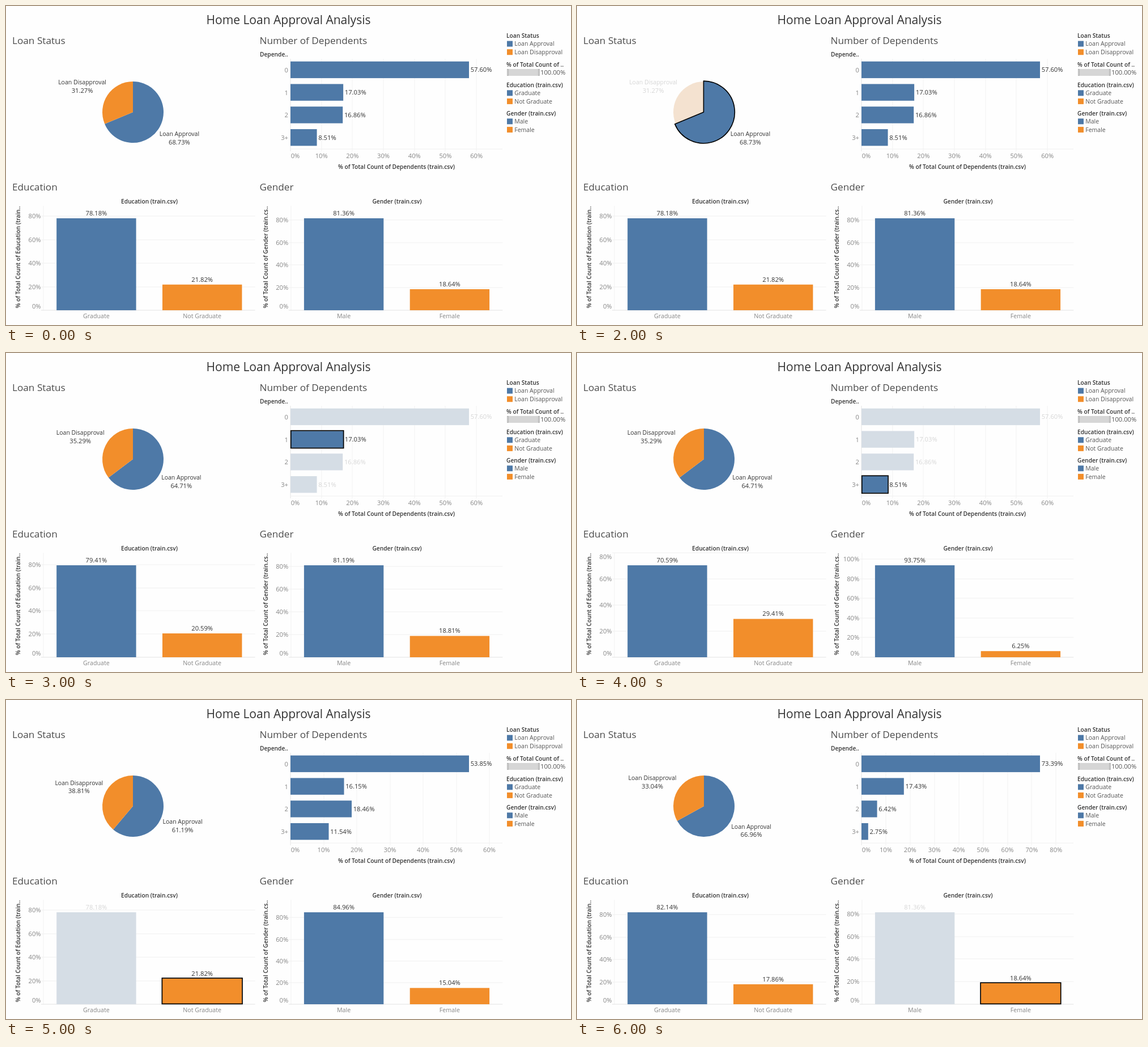
Animation, 997 px wide and 562 px high, one loop 6.5 s. Source, as an HTML page:

```html
<!DOCTYPE html>
<html lang="en">
<head>
<meta charset="utf-8">
<title>Home Loan Approval Analysis</title>
<style>
  html, body { margin: 0; width: 100%; height: 100%; overflow: hidden; background: #fefefe; }
  svg { display: block; width: 997px; height: 562px; font-family: "Open Sans", "Noto Sans", sans-serif; }
</style>
</head>
<body>
<svg id="stage" viewBox="0 0 997 562"></svg>
<script>
const BLUE = '#4e79a7', ORANGE = '#f28e2b';
const DIM = { [BLUE]: '#d5dde5', [ORANGE]: '#f4e2d0' };
const INK = '#333', GREY = '#868686', FADED = '#d6d6d6', GRID = '#f1f1f1', AXIS = '#e4e4e4';
const STEP = 500;

const base = {
  loan: [422, 192], dep: [345, 102, 101, 51],
  edu: [480, 134], sex: [489, 112]
};
const pick = (chart, index, data) => ({ ...base, ...data, chart, index });

const states = [
  base,
  base,
  pick('loan', 1),
  base,
  pick('loan', 0),
  pick('dep', 0, { loan: [238, 107], edu: [275, 70], sex: [258, 80] }),
  pick('dep', 1, { loan: [66, 36], edu: [81, 21], sex: [82, 19] }),
  pick('dep', 2, { loan: [76, 25], edu: [77, 24], sex: [92, 7] }),
  pick('dep', 3, { loan: [33, 18], edu: [36, 15], sex: [45, 3] }),
  pick('edu', 0, { loan: [340, 140], dep: [275, 81, 77, 36], sex: [376, 92] }),
  pick('edu', 1, { loan: [82, 52], dep: [70, 21, 24, 15], sex: [113, 20] }),
  pick('sex', 0, { loan: [339, 150], dep: [258, 82, 92, 45], edu: [376, 113] }),
  pick('sex', 1, { loan: [75, 37], dep: [80, 19, 7, 3], edu: [92, 20] })
];

// y is the vertical centre of the capitals
function text(str, x, y, { size = 10.5, fill = INK, anchor = 'start', weight = 400, turn = 0 } = {}) {
  const spin = turn ? ` transform="rotate(${turn} ${x} ${y})"` : '';
  return `<text x="${x}" y="${y + size * 0.36}" font-size="${size}" fill="${fill}" ` +
    `text-anchor="${anchor}" font-weight="${weight}"${spin}>${str}</text>`;
}
const bold = (str, x, y, opt) => text(str, x, y, { size: 10.2, weight: 600, ...opt });
const number = (str, x, y, opt) => text(str, x, y, { size: 11.2, ...opt });
const rect = (x, y, w, h, fill, extra = '') =>
  `<rect x="${x}" y="${y}" width="${w}" height="${h}" fill="${fill}" ${extra}/>`;
const hline = (x1, x2, y, fill) => rect(x1, Math.round(y) - 0.5, x2 - x1, 1, fill);
const vline = (x, y1, y2, fill) => rect(Math.round(x) - 0.5, y1, 1, y2 - y1, fill);
const outline = (x1, y1, x2, y2) =>
  rect(x1, y1, x2 - x1, y2 - y1, 'none', 'stroke="#000" stroke-width="1.7"');

const percents = counts => {
  const total = counts.reduce((a, b) => a + b);
  return counts.map(n => n / total * 100);
};
const label = p => p.toFixed(2) + '%';

function look(state, chart, i, color) {
  const on = state.chart === chart && state.index === i;
  const off = state.chart === chart && !on;
  return { on, fill: off ? DIM[color] : color, ink: off ? FADED : INK };
}

function pie(state) {
  const cx = 224, cy = 187, r = 54;
  const share = percents(state.loan), split = share[0] / 100;
  const at = (turn, rad, x = cx) => {
    const a = turn * 2 * Math.PI;
    return [x + rad * Math.sin(a), cy - rad * Math.cos(a)];
  };
  const slice = (from, to, rad, x) =>
    `M${x} ${cy}L${at(from, rad, x)}A${rad} ${rad} 0 ${to - from > 0.5 ? 1 : 0} 1 ${at(to, rad, x)}Z`;
  const parts = [
    { name: 'Loan Approval', color: BLUE, from: 0, to: split, dx: 37, dy: 8.5, nudge: -0.6 },
    { name: 'Loan Disapproval', color: ORANGE, from: split, to: 0.99999, dx: -44.5, dy: -22.5, nudge: 0.6 }
  ];
  let shapes = '', edge = '', labels = '';
  parts.forEach((p, i) => {
    const s = look(state, 'loan', i, p.color);
    shapes += `<path d="${slice(p.from, p.to, r, cx)}" fill="${s.fill}"/>`;
    if (s.on) edge = `<path d="${slice(p.from, p.to, r + 0.9, cx + p.nudge)}" fill="${s.fill}" ` +
      'stroke="#000" stroke-width="1.6" stroke-linejoin="round"/>';
    const [x, y] = at((p.from + p.to) / 2, r);
    const opt = { anchor: 'middle', fill: s.ink };
    labels += text(p.name, x + p.dx, y + p.dy, opt) + number(label(share[i]), x + p.dx, y + p.dy + 14.5, opt);
  });
  return shapes + edge + labels;
}

function rows(state) {
  const x0 = 502, right = 876, share = percents(state.dep);
  const scale = 315 / Math.max(...share);
  let grid = '', bars = '';
  for (let v = 0; x0 + v * scale < right - 12; v += 10) {
    const x = x0 + v * scale;
    grid += vline(x, 93, 256, v ? GRID : AXIS) +
      number(v + '%', Math.max(x, x0 + 8.5), 264, { anchor: 'middle', fill: GREY });
  }
  grid += hline(x0, right, 252, GRID);
  ['0', '1', '2', '3+'].forEach((name, i) => {
    const y = 112.4 + i * 39.75, w = share[i] * scale;
    const s = look(state, 'dep', i, BLUE);
    bars += rect(x0, y - 14.7, w, 29.4, s.fill);
    if (s.on) bars += outline(x0 + 0.7, y - 15.4, x0 + w + 0.5, y + 15.4);
    bars += number(name, 498, y + 0.5, { anchor: 'end', fill: GREY }) +
      number(label(share[i]), x0 + w + 2.7, y, { fill: s.ink });
  });
  return grid + bars;
}

function columns(state, chart, left, names) {
  const top = 352, floor = 536, band = 186.8, wide = 140.4;
  const share = percents(state[chart]), scale = 162 / Math.max(...share);
  let grid = vline(left, top, floor, GRID), bars = '';
  for (let v = 0; floor - v * scale >= top; v += 20) {
    const y = floor - v * scale;
    grid += hline(left - 4, left + 2 * band, y, v ? GRID : AXIS) +
      number(v + '%', left - 4.5, Math.min(Math.max(y, top + 6.5), floor - 7), { anchor: 'end', fill: GREY });
  }
  names.forEach((name, i) => {
    const mid = left + band * (i + 0.5), x = mid - wide / 2;
    const h = share[i] * scale, y = floor - h;
    const s = look(state, chart, i, i ? ORANGE : BLUE);
    bars += rect(x, y, wide, h, s.fill);
    if (s.on) bars += outline(x - 0.6, y - 0.8, x + wide + 0.6, floor - 0.6);
    bars += number(label(share[i]), mid, y - 9.3, { anchor: 'middle', fill: s.ink }) +
      text(name, mid, 546, { anchor: 'middle', fill: GREY, size: 10.7 });
  });
  return grid + bars;
}

function legend(title, y, names) {
  return bold(title, 883, y) + names.map((name, i) => {
    const row = y + 14.3 + i * 14.6;
    return rect(884, row - 5, 10, 10, i ? ORANGE : BLUE) + text(name, 897.3, row, { fill: '#555' });
  }).join('');
}

function frame() {
  const mid = { anchor: 'middle' };
  const head = { size: 17.2, fill: '#4c4c4c' };
  const side = { anchor: 'middle', turn: -90 };
  return text('Home Loan Approval Analysis', 498.5, 24, { ...mid, size: 21 }) +
    text('Loan Status', 11, 60.5, head) +
    text('Number of Dependents', 447.5, 60.5, head) +
    text('Education', 11, 318.5, head) +
    text('Gender', 447.5, 318.5, head) +
    bold('Depende..', 448, 85.5) +
    bold('% of Total Count of Dependents (train.csv)', 689, 283.5, mid) +
    bold('Education (train.csv)', 253, 344, mid) +
    bold('Gender (train.csv)', 690, 344, mid) +
    bold('% of Total Count of Education (train..', 21.5, 442.5, side) +
    bold('% of Total Count of Gender (train.cs..', 458, 442.5, side) +
    legend('Loan Status', 52.3, ['Loan Approval', 'Loan Disapproval']) +
    bold('% of Total Count of ..', 883, 103) +
    rect(885, 111, 56, 12, '#d6d6d6') +
    rect(884.5, 111.5, 2, 11, '#d6d6d6', 'stroke="#aaa" stroke-width=".8"') +
    rect(939.5, 111.5, 2, 11, '#d6d6d6', 'stroke="#aaa" stroke-width=".8"') +
    number('100.00%', 943, 117, { fill: '#555' }) +
    legend('Education (train.csv)', 139, ['Graduate', 'Not Graduate']) +
    legend('Gender (train.csv)', 189, ['Male', 'Female']);
}

const draw = state => pie(state) + rows(state) +
  columns(state, 'edu', 66, ['Graduate', 'Not Graduate']) +
  columns(state, 'sex', 502.7, ['Male', 'Female']);

const stage = document.getElementById('stage');
stage.innerHTML = frame() + '<g id="charts"></g>';
const charts = document.getElementById('charts');
let shown = -1;

function tick() {
  const i = Math.floor(performance.now() / STEP) % states.length;
  if (i !== shown) {
    charts.innerHTML = draw(states[i]);
    shown = i;
  }
  requestAnimationFrame(tick);
}
tick();
</script>
</body>
</html>
```
